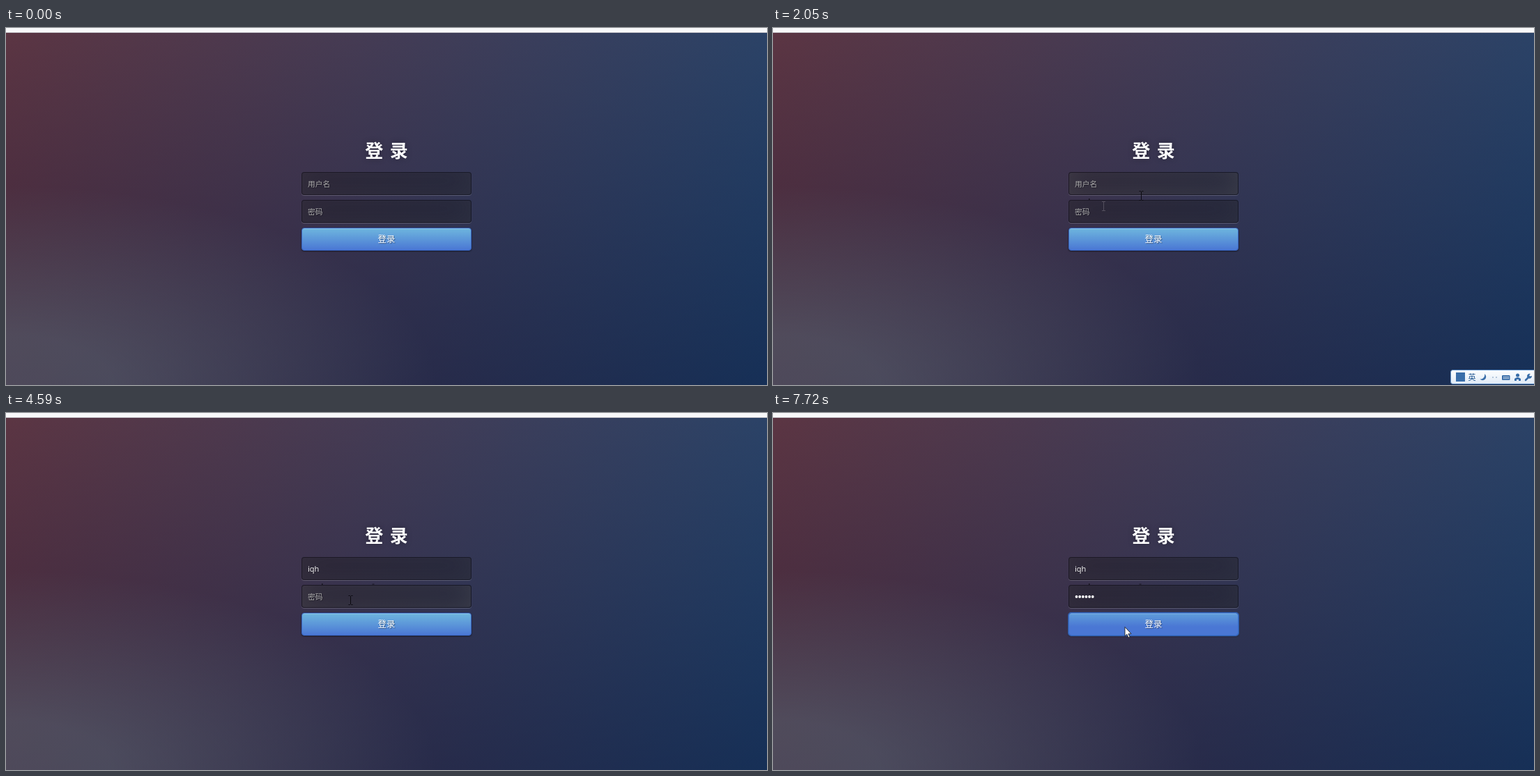
An HTML page for the animation above (8000 ms loop, 1092 by 513 pixels).

```html
<!DOCTYPE html>
<html lang="zh">
<head>
<meta charset="utf-8">
<title>登录</title>
<style>
  html, body { margin: 0; width: 100%; height: 100%; overflow: hidden; }
  body { position: relative; background: #f8f8fa; font-family: "Noto Sans CJK SC", "Noto Sans CJK", sans-serif; color: #fff; }
  body > * { position: absolute; box-sizing: border-box; }
  .page {
    left: 0; top: 7px; width: 1092px; height: 506px;
    background:
      radial-gradient(ellipse farthest-corner at 0% 100%, rgba(104,128,138,.4) 10%, rgba(138,114,76,0) 40%),
      linear-gradient(rgba(57,173,219,.25), rgba(42,60,87,.4)),
      linear-gradient(135deg, #670d10, #092756);
    box-shadow: 0 -1px #c4c2c8;
  }
  h1 {
    left: 424px; top: 155px; width: 245px; margin: 0; text-align: center;
    font-size: 26px; line-height: 40px; letter-spacing: .8px; word-spacing: 2px;
    text-shadow: 0 0 8px rgba(0,0,0,.3);
  }
  .field, .button { left: 424px; width: 244px; height: 33px; }
  .field {
    --glow: .2;
    padding-left: 8px; line-height: 31px; font-size: 10.7px;
    background: rgba(0,0,0,.3); border: 1px solid rgba(0,0,0,.3); border-radius: 4px;
    box-shadow: inset 0 -4px 36px rgba(100,100,100,var(--glow)), 0 1px 1px rgba(255,255,255,.2);
    text-shadow: 1px 1px 1px rgba(0,0,0,.3);
  }
  .field.empty { color: #a9a9a9; }
  .field.typed { font: 11px/31px "Open Sans", sans-serif; }
  .button {
    top: 287px; line-height: 30px; font-size: 12.4px; text-align: center;
    background: #4a77d4 linear-gradient(#6eb6de, #4a77d4) repeat-x;
    border: 1px solid #3762bc; border-radius: 4px;
    box-shadow: inset 0 1px 0 rgba(255,255,255,.2), 0 1px 2px rgba(0,0,0,.5);
    text-shadow: 1px 1px 1px rgba(0,0,0,.4);
  }
  .button.hover { background-position: 0 -12px; background-repeat: no-repeat; }
  .button.focus { outline: 2px solid rgba(58,120,216,.6); outline-offset: -1px; }
  svg { left: 0; top: 0; }
</style>
</head>
<body>
<div class="page"></div>
<h1>登 录</h1>
<div class="field" id="user" style="top:207px"></div>
<div class="field" id="pass" style="top:247px"></div>
<div class="button" id="button">登录</div>

<svg width="1092" height="513">
  <defs>
    <linearGradient id="barFill" x2="0" y2="1">
      <stop stop-color="#fff"/><stop offset="1" stop-color="#dfeaf6"/>
    </linearGradient>
  </defs>

  <g id="bar" fill="#3a6ea9">
    <rect x="972.5" y="491.5" width="125" height="20" rx="3" fill="url(#barFill)" stroke="#5b8cc4"/>
    <rect x="980" y="495" width="13" height="13"/>
    <text x="997.5" y="506" font-size="11" fill="#1f5590">英</text>
    <path d="M1021 497a5 5 0 1 1-6.500 7.500a6 6 0 0 0 6.500-7.500z"/>
    <path d="M1032 501h2v2h-2zM1037 501h2v2h-2z" fill="#b4c6da"/>
    <rect x="1046" y="499" width="11.500" height="7" rx="1"/>
    <path d="M1048 501.500h8M1048 503.700h8" stroke="#fff" stroke-dasharray="1.500 .7"/>
    <circle cx="1068.500" cy="499" r="2.500"/>
    <path d="M1064 507v-3q4.500-4 9 0v3h-3v-2h-3v2z"/>
    <path d="M1080 506l5-5" stroke="#3a6ea9" stroke-width="2.500" stroke-linecap="round"/>
    <path d="M1087 497a3.500 3.500 0 1 0 2 3l-3 .5-1-1.500z"/>
  </g>

  <g id="trail" fill="none" stroke="#77727f" stroke-opacity=".55">
    <path d="M472 249.500h5M474.500 250v12M472 262.500h5"/>
  </g>
  <path id="speckA" d="M453 245h1.500v2h-1.500z" fill="#17151f"/>
  <path id="speckB" d="M525.500 245.500h3v1h-3z" fill="#17151f"/>

  <g id="dots" fill="#fff"></g>
  <rect id="caret" width="1" height="14" fill="#fff"/>

  <g id="arrow" fill="#fff" stroke="#111" stroke-width=".8">
    <path d="M0 0V13L2.800 10.400L5 15.300L7 14.400L4.900 9.700H9z"/>
  </g>
  <g id="beam" fill="none" stroke="#0b0a10">
    <path d="M-3-6.500H-.8M.8-6.500H3M0-6V6M-3 6.500H-.8M.8 6.500H3"/>
  </g>
  <g id="hand" fill="#fff" stroke="#111" stroke-width=".9" stroke-linejoin="round">
    <path d="M3 10V1.500Q4.200-.6 5.400 1.500V6.500Q7-.1 7.700 6.400V7Q9.300 5.700 9.900 7.500Q12 6.800 12.200 8.700V12.500L10.500 17.300H4.500L.4 11.500Q.2 9.200 3 11z"/>
  </g>
</svg>

<script>
const LOOP = 8000;
const NAME = "iqh";
const $ = id => document.getElementById(id);

// Pointer moves: time, shape, x, y
const pointerMoves = [
  [880, "arrow", 455, 242.5],
  [970, "beam", 460.5, 252],
  [1130, "beam", 460.5, 239],
  [1620, "beam", 527.5, 240],
  [1760, "beam", 528.5, 240],
  [1890, "beam", 528.5, 241],
  [3570, "beam", 499.5, 262.5],
  [3720, "beam", 494.5, 269],
  [7020, "arrow", 487.5, 282],
  [7160, "hand", 495, 293],
  [7290, "hand", 502, 307],
  [7560, "arrow", 505, 307.5]
];
// Caret changes: time, x (null when hidden), top
const caretMoves = [
  [0, null], [1400, 433, 216], [2050, null], [2560, 433, 216],
  [2670, 436, 216], [2790, 443, 216], [2930, 450, 216], [3460, null],
  [3900, 433, 256], [4450, null], [5000, 433, 256]
];
const nameKeys = [2670, 2790, 2930];
const passKeys = [5050, 5420, 5780, 6050, 6460, 6850];
const dotPitch = 4.65;

passKeys.forEach((key, i) => caretMoves.push([key, Math.round(433 + dotPitch * (i + 1)), 256]));
caretMoves.push([7720, null]);

const dots = passKeys.map((key, i) => {
  const dot = document.createElementNS("http://www.w3.org/2000/svg", "circle");
  dot.setAttribute("cx", 435.5 + dotPitch * i);
  dot.setAttribute("cy", 264);
  dot.setAttribute("r", 1.9);
  return $("dots").appendChild(dot);
});

const latest = (moves, t) => moves.filter(move => move[0] <= t).pop();
const count = (keys, t) => keys.filter(key => key <= t).length;
const between = (t, a, b) => t >= a && t < b;
const ramp = (t, a, b) => Math.min(1, Math.max(0, (t - a) / (b - a)));
const show = (node, on) => { node.style.display = on ? "" : "none"; };

function shapeAt(y) {
  if (y > 287 && y < 320) return "hand";
  return y > 247 && y < 279 ? "beam" : "arrow";
}

function pointerAt(t) {
  if (t < 70) return [];
  if (t >= 880) return latest(pointerMoves, t).slice(1);
  // Ten sampled positions along a straight, slowing sweep
  const u = Math.min(9, Math.floor((t - 70) / 82.2)) / 9;
  const p = 1 - (1 - u) ** 1.4;
  const y = 491 - 247 * p;
  return [shapeAt(y), 954 - 501.5 * p, y];
}

function setField(field, text, hint, glow) {
  const content = text || hint;
  if (field.textContent !== content) field.textContent = content;
  field.classList.toggle("empty", !text);
  field.classList.toggle("typed", !!text);
  field.style.setProperty("--glow", .2 + .2 * glow);
}

function draw(t) {
  const typed = count(passKeys, t);
  setField($("user"), NAME.slice(0, count(nameKeys, t)), "用户名",
    ramp(t, 1370, 1400) - ramp(t, 4050, 4300));
  setField($("pass"), "", typed ? "" : "密码",
    ramp(t, 4050, 4300) - ramp(t, 7290, 7560));
  dots.forEach((dot, i) => show(dot, i < typed));

  const [, caretX, caretY] = latest(caretMoves, t);
  show($("caret"), caretX != null);
  if (caretX != null) {
    $("caret").setAttribute("x", caretX);
    $("caret").setAttribute("y", caretY);
  }

  const [shape, x, y] = pointerAt(t);
  for (const name of ["arrow", "beam", "hand"]) {
    show($(name), name === shape);
    if (name === shape) $(name).setAttribute("transform", `translate(${x} ${y})`);
  }

  show($("bar"), between(t, 1400, 4180));
  show($("trail"), between(t, 800, 4180));
  show($("speckA"), t >= 1130);
  show($("speckB"), t >= 3570);
  $("button").classList.toggle("hover", t >= 7290);
  $("button").classList.toggle("focus", t >= 7420);
}

const start = performance.now();
function tick() {
  draw((performance.now() - start) % LOOP);
  requestAnimationFrame(tick);
}
tick();
</script>
</body>
</html>
```
